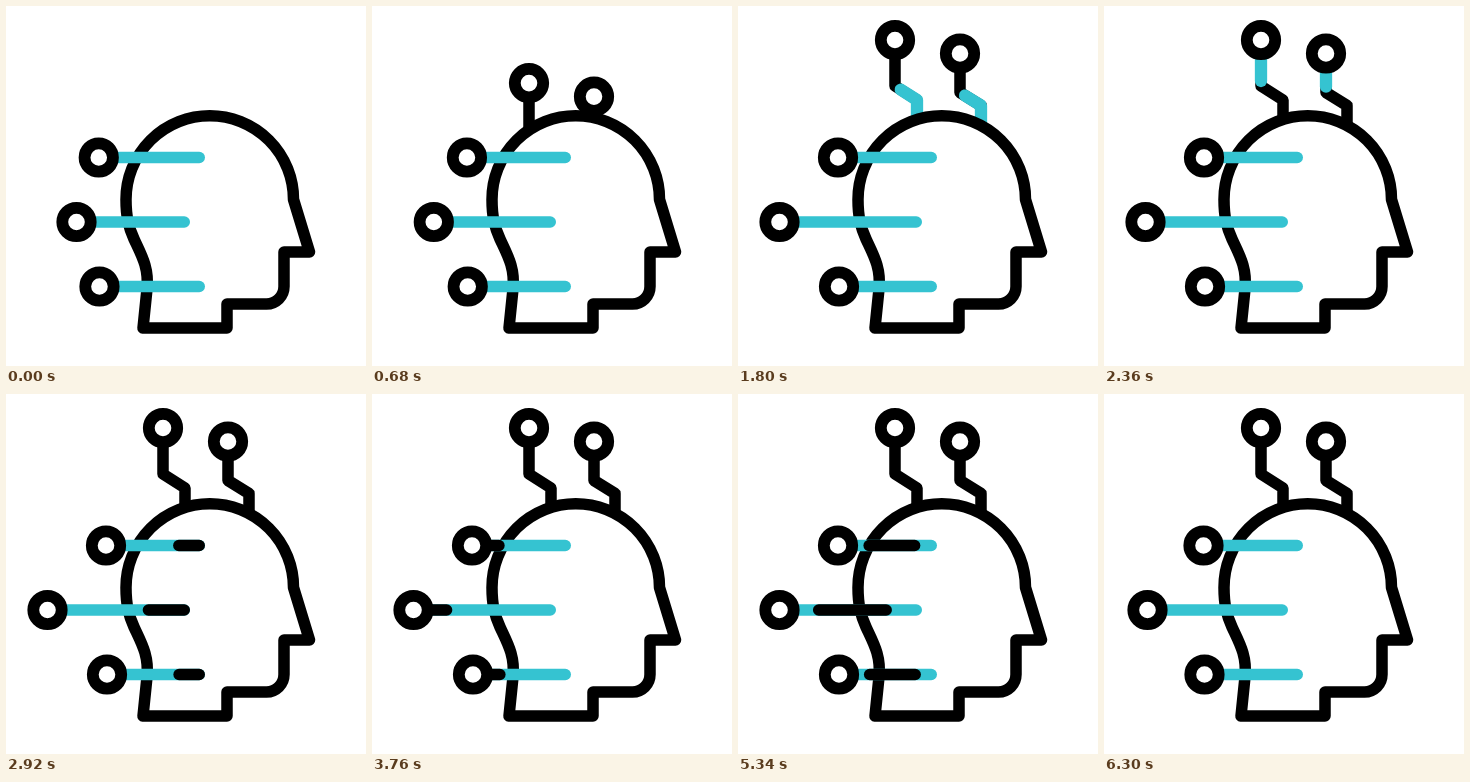
An HTML page with a canvas for the animation above (6.32 s loop, 360x360 px).

```html
<!DOCTYPE html>
<html lang="en">
<head>
<meta charset="utf-8">
<title>Connected mind</title>
<style>
  html, body { margin: 0; width: 100%; height: 100%; overflow: hidden; background: #fff; }
  canvas { display: block; width: 360px; height: 360px; }
</style>
</head>
<body>
<canvas id="stage"></canvas>
<script>
const LOOP = 6320;
const INK = '#000', CYAN = '#35c3d1', PAPER = '#fff';
const WIDTH = 11.5, CAP = WIDTH / 2;
const PASS = 1250;
const ANTENNA_PASS = 1286;
const LINE_PASSES = [2600, 4690];

// x, y: resting node; end: right tip; dash: length of the travelling stroke
const lines = [
  { x: 100, y: 151.5, end: 199, dash: 57, drift: -0.25 },
  { x: 41.5, y: 216, end: 184, dash: 79, drift: 1 },
  { x: 101, y: 280.5, end: 199, dash: 57, drift: -0.26 }
];

// Points run from inside the head up to the node
const antennas = [
  [[179, 125], [179, 94], [157, 80], [157, 34]],
  [[243, 131], [243, 99.5], [222, 86.5], [222, 47.5]]
];

const head = new Path2D(`M137 322 H221 V298 H260.5 A17.5 17.5 0 0 0 278 280.5
  V246 H303.5 L287.5 193.5 A83.75 83.75 0 0 0 120 193.5 C120 212 123 222 128 233
  C136 250 143 262 141 283 Z`);

const canvas = document.getElementById('stage');
const ctx = canvas.getContext('2d');
const ratio = window.devicePixelRatio || 1;
canvas.width = canvas.height = 360 * ratio;
ctx.scale(ratio, ratio);
ctx.lineJoin = 'round';

const clamp = (v, lo, hi) => Math.min(hi, Math.max(lo, v));

// Three uneven holds (20, 100, 20 ms) per 140 ms, evenly spaced in motion
function stepTime(t) {
  const r = t % 140;
  const step = r < 20 ? 0 : r < 120 ? 1 : 2;
  return (3 * Math.floor(t / 140) + step) * 140 / 3;
}

function nodeShift(t) {
  if (t < 1192) return 29 * (1 - (t / 1192) ** 2);
  return t > 6210 ? (t - 6210) / 45 : 0;
}

// Antennas rise out of the head, overshoot, then settle
function antennaShift(t) {
  if (t < 607) return 115 - 64 * (t / 607) ** 1.2;
  if (t < 1073) return -7 + 58 * (1 - (t - 607) / 466) ** 1.4;
  if (t < 1240) return -3.5 * (1 + Math.cos(Math.PI * (t - 1073) / 167));
  return 0;
}

function stroke(points, color, cap = 'round', width = WIDTH) {
  ctx.beginPath();
  points.forEach(([x, y]) => ctx.lineTo(x, y));
  ctx.strokeStyle = color;
  ctx.lineWidth = width;
  ctx.lineCap = cap;
  ctx.stroke();
}

function node(x, y) {
  ctx.beginPath();
  ctx.arc(x, y, 14.2, 0, 2 * Math.PI);
  ctx.fillStyle = PAPER;
  ctx.fill();
  ctx.strokeStyle = INK;
  ctx.lineWidth = 11.8;
  ctx.stroke();
}

function drawAntenna(points, t) {
  const p = (t - ANTENNA_PASS) / PASS;
  ctx.save();
  ctx.translate(0, antennaShift(t));
  stroke(points, INK, 'butt');
  if (p > 0 && p < 1) {
    ctx.setLineDash([46, 500]);
    ctx.lineDashOffset = 46 - p * 129;
    stroke(points, CYAN, 'round', WIDTH + 0.8);
    ctx.setLineDash([]);
  }
  node(...points[3]);
  ctx.restore();
}

function drawLine({ x, y, end, dash, drift }, t) {
  const cx = x + drift * nodeShift(t);
  const tip = end - CAP;
  stroke([[cx, y], [tip, y]], CYAN);
  for (const start of LINE_PASSES) {
    const p = (t - start) / PASS;
    if (p <= 0 || p >= 1) continue;
    const lead = end - p * (end - x - 20 + dash);
    stroke([
      [clamp(lead + CAP, cx, tip), y],
      [clamp(lead + dash - CAP, cx, tip), y]
    ], INK);
  }
  node(cx, y);
}

function drawHead() {
  ctx.fillStyle = PAPER;
  ctx.fill(head);
  ctx.strokeStyle = INK;
  ctx.lineWidth = WIDTH;
  ctx.stroke(head);
}

function draw(t) {
  ctx.fillStyle = PAPER;
  ctx.fillRect(0, 0, 360, 360);
  antennas.forEach(a => drawAntenna(a, t));
  drawHead();
  lines.forEach(l => drawLine(l, t));
}

const begin = performance.now();
function tick() {
  draw(stepTime((performance.now() - begin) % LOOP));
  requestAnimationFrame(tick);
}
tick();
</script>
</body>
</html>
```
